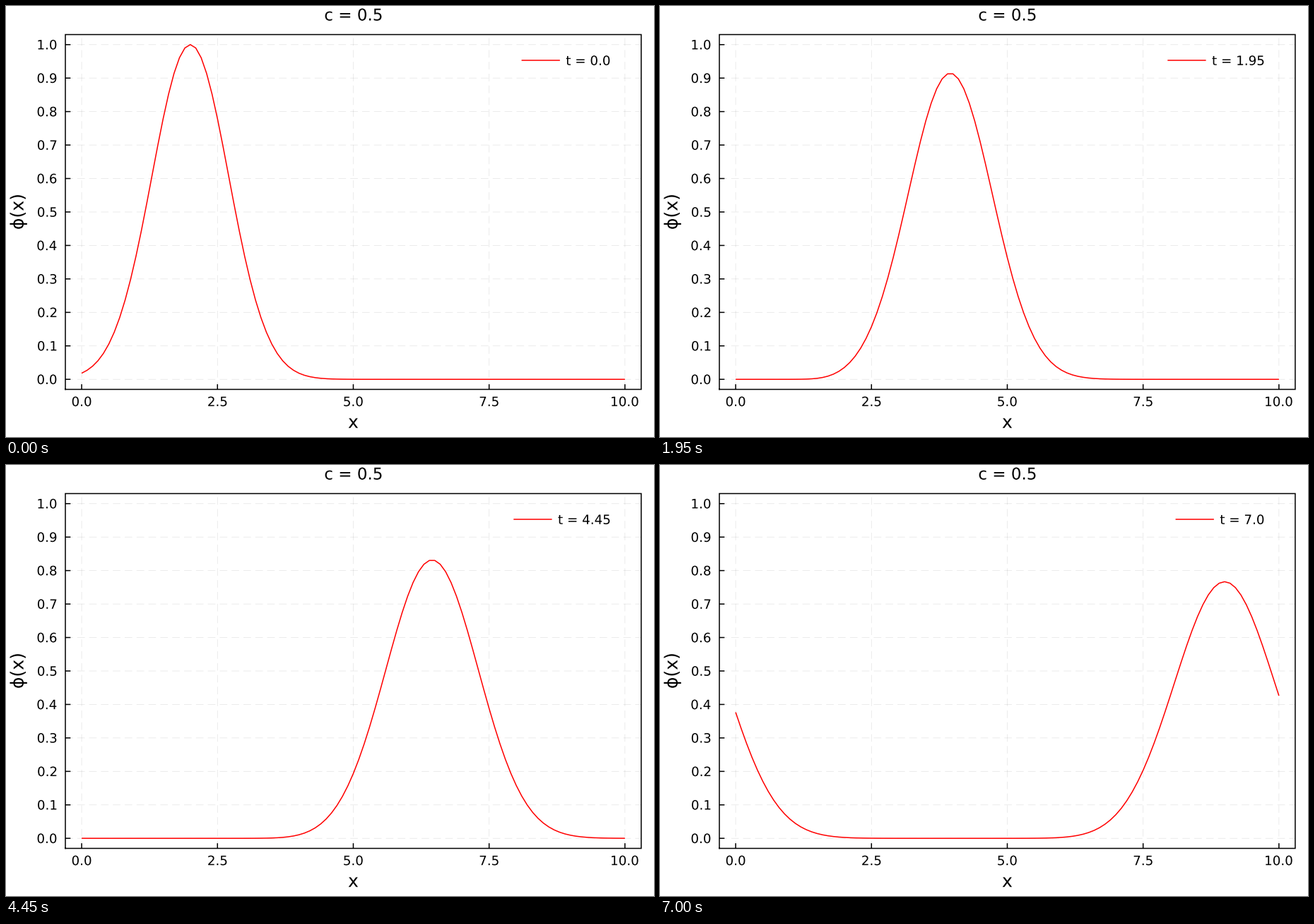
A matplotlib script that plays this animation: 917 by 611 pixels, repeating every 7.05 s.

```python
import numpy as np
import matplotlib.pyplot as plt
from matplotlib.animation import FuncAnimation
from matplotlib.patches import PathPatch
from matplotlib.textpath import TextPath
from matplotlib.transforms import Affine2D

W, H, DPI = 917, 611, 100
PX = 72 / DPI
LEFT, RIGHT, TOP, BOTTOM = 84.0, 898.9, 40.5, 543.5
X0, DX = 107.06, 76.88      # pixel of x = 0, pixels per unit
Y0, DY = 529.25, 474.5      # pixel of y = 0, pixels per unit
TICK, TITLE, GUIDE = 18.3, 23.0, 25.2
STEPS, DT, C = 141, 0.05, 0.5

plt.rcParams["font.family"] = "DejaVu Sans"
fig = plt.figure(figsize=(W / DPI, H / DPI), dpi=DPI, facecolor="white")
ax = fig.add_axes([0, 0, 1, 1])
ax.set_xlim(0, W)
ax.set_ylim(H, 0)
ax.axis("off")


def stroke(xs, ys, color="black", width=1.53, **kw):
    kw.setdefault("solid_capstyle", "butt")
    return ax.plot(xs, ys, color=color, lw=width * PX, snap=False, **kw)[0]


def text_path(s, size, x, base, align="center", angle=0):
    """Glyph outlines aligned by their ink along the baseline."""
    path = TextPath((0, 0), s, size=size)
    box = path.get_extents()
    shift = {"center": (box.x0 + box.x1) / 2, "right": box.x1}[align]
    move = Affine2D().translate(-shift, 0).scale(1, -1).rotate_deg(angle)
    return move.translate(x, base).transform_path(path)


def label(*args, **kw):
    patch = PathPatch(text_path(*args, **kw), fc="black", lw=0, snap=False)
    return ax.add_patch(patch)


def grid(xs, ys):
    dashes = (0, (10.7 / 0.77, 6.1 / 0.77))
    stroke(xs, ys, width=0.77, alpha=0.1, ls=dashes, dash_capstyle="butt")


for v in np.arange(0, 10.1, 2.5):
    x = X0 + v * DX
    grid([x, x], [BOTTOM, TOP])
    stroke([x, x], [BOTTOM, BOTTOM - 7.3])
    label(f"{v:.1f}", TICK, x, 567.2)

for v in np.arange(11) / 10:
    y = Y0 - v * DY
    grid([LEFT, RIGHT], [y, y])
    stroke([LEFT, LEFT + 7.3], [y, y])
    label(f"{v:.1f}", TICK, 71.3, y + 6.7, align="right")

stroke([LEFT, RIGHT, RIGHT, LEFT, LEFT], [BOTTOM, BOTTOM, TOP, TOP, BOTTOM],
       solid_capstyle="projecting", solid_joinstyle="miter")
label("c = 0.5", TITLE, 491.5, 20.5)
label("x", GUIDE, 491.4, 598.2)
label("\u03d5(x)", GUIDE, 24.6, 292, angle=-90)

# Upwind advection on a periodic grid
x = np.linspace(0, 10, 101)
waves = [np.exp(-(x - 2) ** 2)]
for _ in range(STEPS - 1):
    u = waves[-1]
    waves.append(u - C * (u - np.roll(u, 1)))

curve = stroke(X0 + x * DX, Y0 - waves[0] * DY, "red", solid_joinstyle="round")
key = stroke([729.5, 783.8], [77, 77], "red")
time_label = label("t = 0.0", TICK, 854.3, 83.8, align="right")


def update(i):
    curve.set_ydata(Y0 - waves[i] * DY)
    path = text_path(f"t = {round(i * DT, 2)}", TICK, 854.3, 83.8, align="right")
    time_label.set_path(path)
    start = path.get_extents().x0
    key.set_xdata([start - 63.2, start - 8.9])
    return curve, key, time_label


anim = FuncAnimation(fig, update, frames=STEPS, interval=50, repeat=True,
                     repeat_delay=0, blit=False)
plt.show()
```
